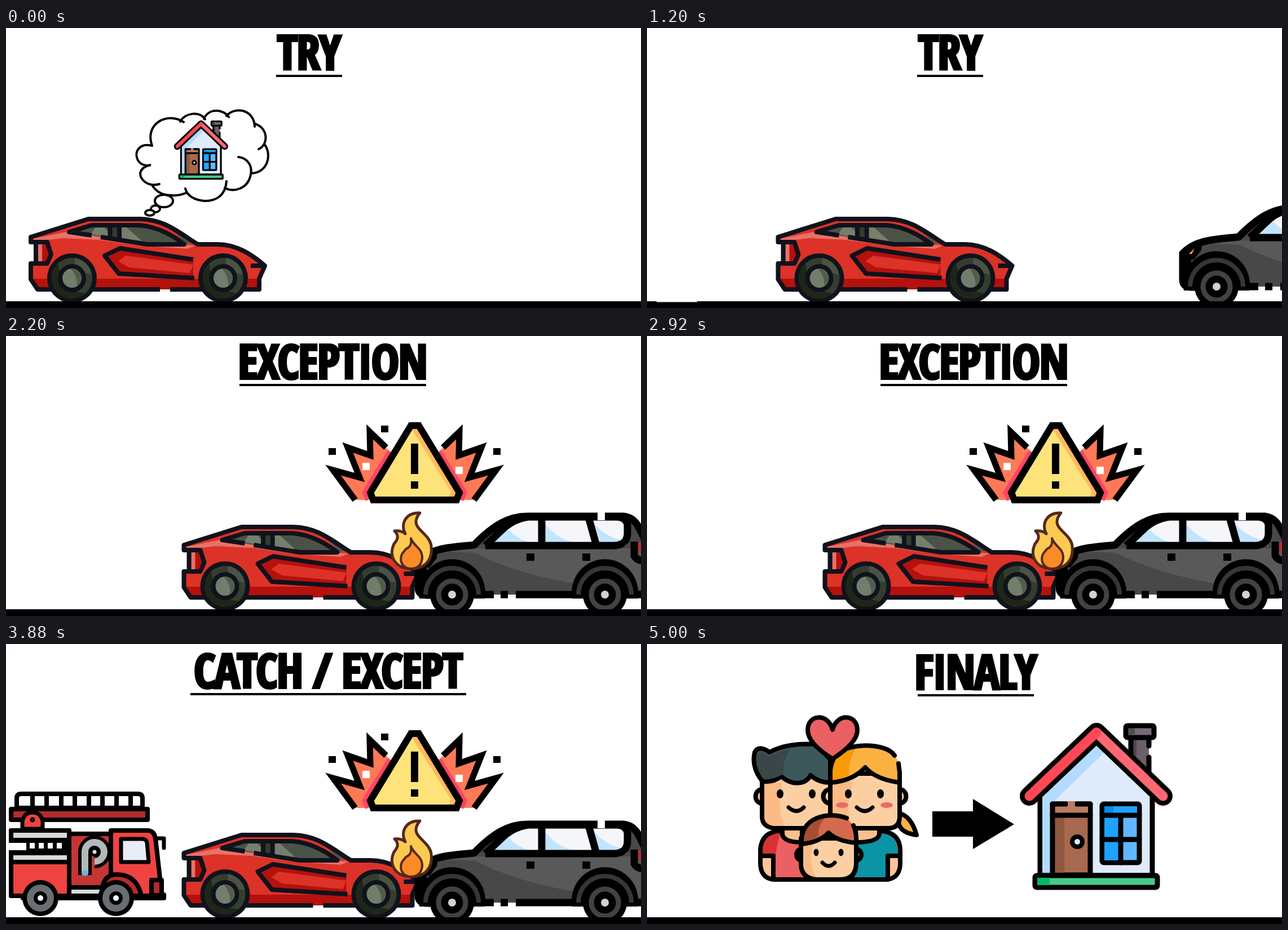
Recreate the animation shown at these times as an HTML page. Size 1126x497 px, loop 5.8 s.

```html
<!DOCTYPE html>
<html lang="en">
<head>
<meta charset="utf-8">
<title>Try, catch, finally</title>
<style>
html, body { margin: 0; width: 100%; height: 100%; overflow: hidden; background: #fff; }
svg { display: block; width: 100%; height: 100%; }
#title {
  font: 900 84px "Open Sans Condensed", "Roboto Condensed", "Open Sans", sans-serif;
  font-stretch: extra-condensed; letter-spacing: -2px; text-anchor: middle;
  stroke: #000; stroke-width: 4;
}
.line { fill: none; stroke: #000; }
.ink { stroke: #000; stroke-linejoin: round; stroke-linecap: round; }
.layer { display: none; }
</style>
</head>
<body>
<svg viewBox="0 0 1126 497">
<defs>
  <g id="carWheel">
    <circle r="44" fill="#10121c"/><circle r="36" fill="#343e2f"/>
    <path d="M-25-26A36 36 0 0 0 24 27Q-18 22-25-26" fill="#1e2717"/>
    <path d="M5-36A36 36 0 0 1 35-6L20-10Q16-22 5-25Z" fill="#4a5344"/>
    <circle r="25" fill="#10121c"/><circle r="17" fill="#727d6b"/>
    <path d="M-2-17A17 17 0 0 1 9 14Q10-3-2-17" fill="#535d4d"/>
  </g>
  <g id="suvWheel">
    <path d="M-58 7A59 59 0 1 1 58 7Z"/>
    <path d="M-47 0A47 47 0 0 1 47 0" fill="none" stroke="#363636" stroke-width="8"/>
    <circle r="39"/>
    <circle r="24" fill="none" stroke="#424242" stroke-width="9"/>
    <circle r="7" fill="#d2d2d2"/>
  </g>
  <g id="truckWheel">
    <circle r="32"/><circle r="24" fill="#696e73"/><circle r="12"/>
  </g>
  <g id="burst">
    <path d="M618 291 580 238 627 251 606 198 646 212 645 170 681 205 637 291Z" fill="#ff7956"/>
    <path d="M681 205 636 278 642 291" fill="none" stroke="#ff4368" stroke-width="9"/>
    <path class="line" d="M619 291 580 238 627 251 606 198 646 212 645 170 674 198" stroke-width="11" stroke-miterlimit="8"/>
    <path d="M572 199h13v12h-13z"/>
  </g>
  <g id="home">
    <g class="ink" stroke-width="9">
      <path d="M858 165h32v62l-32-30z" fill="#6b6067" stroke="none"/>
      <path d="M858 165h10v45l-10-10z" fill="#51474f" stroke="none"/>
      <path d="M858 165v45M890 165v16M890 201v27" fill="none"/>
      <rect x="849" y="145" width="50" height="21" rx="3" fill="#776a76"/>
      <path d="M854 150h11v12h-11z" fill="#544a52" stroke="none"/>
      <path d="M697 265 797 170 896 265V411H697Z" fill="#dfeafb"/>
      <path d="M701 268 797 176 812 191 716 285V406H701Z" fill="#b3dbff" stroke="none"/>
      <path d="M719 410V284H786V410Z" fill="#a8694f"/>
      <path d="M724 305h16v101h-16z" fill="#8f573f" stroke="none"/>
      <path d="M724 284h58v17h-58z" fill="#b97c63" stroke="none"/>
      <path d="M719 304H786M719 284H743M762 284H786" fill="none"/>
      <path d="M746 279h13v9h-13z" fill="#b97c63" stroke="none"/>
      <circle cx="763" cy="351" r="9" fill="#dfeafb" stroke-width="8"/>
      <rect x="807" y="284" width="66" height="104" rx="3" fill="#61b7ff"/>
      <path d="M811 288h25v96h-25z" fill="#20a2ff" stroke="none"/>
      <path d="M811 288h16v12h-16z" fill="#0789ef" stroke="none"/>
      <path d="M827 288h42v12h-42z" fill="#20a2ff" stroke="none"/>
      <path d="M807 304H873M807 347H873M840 304V388" fill="none"/>
      <rect x="688" y="411" width="217" height="21" rx="3" fill="#45ca8b"/>
      <path d="M692 415h22v13h-22z" fill="#00b767" stroke="none"/>
      <path d="M678 270 797 157 915 270" fill="none" stroke-width="34"/>
      <path d="M797 157 915 270" fill="none" stroke="#ff6773" stroke-width="17"/>
      <path d="M678 270 797 157" fill="none" stroke="#ff4855" stroke-width="17"/>
    </g>
  </g>
</defs>

<text id="title"></text>
<rect id="underline" height="4"/>

<g id="thought" class="layer">
  <g class="line" stroke-width="4" stroke-linecap="round">
    <path d="M259 209C245 170 286 148 315 167M309 166C318 150 344 147 353 162M351 161C360 141 386 144 395 158M391 156C407 138 440 145 441 175M441 170C464 176 467 206 448 215M458 206C473 226 463 258 434 258M412 229C429 231 437 245 434 260C429 286 404 292 388 284M391 272C389 298 372 307 353 307C335 306 321 298 318 285M321 292Q308 298 294 297Q270 297 259 279M272 277C250 283 238 268 238 258Q240 246 257 243Q242 247 234 235C226 220 237 203 259 209"/>
    <ellipse cx="280" cy="307" rx="16" ry="11"/>
    <ellipse cx="265" cy="321" rx="8" ry="6" fill="#fff"/>
    <ellipse cx="255" cy="328" rx="8" ry="5" fill="#fff"/>
  </g>
  <use href="#home" transform="translate(63 114.3) scale(.355)"/>
</g>

<g id="car" class="layer">
  <path d="M44 371 146 339H238C280 340 302 360 340 384H375C410 384 437 403 459 422L449 445V464H56L44 446V418H53V380H44Z" fill="#dc3228"/>
  <path d="M48 374 112 361 170 371 250 385 318 385 336 386 322 392 235 386 165 376 100 373 48 379Z" fill="#e77268"/>
  <path d="M48 445H449V464H56Z" fill="#b5110d"/>
  <path d="M268 346Q300 357 332 382L318 382Q300 358 268 346" fill="#4a5144"/>
  <path d="M53 380H73L80 402 73 418H53Z" fill="#b5110d"/>
  <path d="M57 384h7v30h-7z" fill="#e77268"/>
  <path d="M200 392 332 412V441L202 436 176 404Z" fill="#b5110d"/>
  <path d="M199 414 212 404 332 420 326 435 218 425Z" fill="#dc3228"/>
  <path d="M112 362 152 350H235C270 352 300 371 316 384H250Z" fill="#4b5346"/>
  <path d="M150 366 160 352H172L181 361V371ZM205 352H212L243 380 205 374Z" fill="#767f6c"/>
  <path d="M188 352h9v22h-9z" fill="#323b2c"/>
  <g fill="none" stroke="#10121c" stroke-width="8" stroke-linejoin="round">
    <path d="M273 464H56L44 446V418H53V380H44V371L146 339H238C280 340 302 360 340 384H375C410 384 437 403 459 422L449 445V464H291M53 380H73L80 402 73 418H53"/>
    <path d="M152 368 112 362 152 350H235C270 352 300 371 316 384H250L168 371M184.500 350V373M201 350V376"/>
    <path d="M332 411 202 391 175 404 200 436 334 444M434 422H459"/>
  </g>
  <use href="#carWheel" x="117" y="444"/>
  <use href="#carWheel" x="385" y="444"/>
</g>

<g id="suv" class="layer">
  <path d="M731 400C755 375 790 375 830 371C865 335 892 320 925 320H1095C1123 322 1128 350 1140 380V459H745L731 450Z" fill="#484848"/>
  <path d="M775 384Q805 375 840 377H1130V450Q1060 446 1000 438Q900 420 832 385Q800 382 775 384Z" fill="#595959"/>
  <path d="M850 372 905 328H1092Q1106 330 1108 352L1100 372Z" fill="#f4f6fa"/>
  <path d="M862 367 889 341Q905 360 930 367ZM957 334Q975 360 1010 367H957ZM1043 333Q1062 356 1094 363L1085 367H1053Z" fill="#c1e4ff"/>
  <g class="line" stroke-width="13" stroke-linejoin="round">
    <path d="M766 460H745Q731 460 731 446V400C755 375 790 375 830 371C865 335 892 320 925 320H1095C1118 323 1122 340 1132 360"/>
    <path d="M850 372 885 339Q902 325 925 321M850 372H1080Q1102 370 1102 350V335Q1100 323 1085 321M950 320V372M1033 322 1047 372"/>
    <path d="M825 459H865M877 459H890M904 459H1015M1105 459H1140M1114 365V390Q1118 398 1130 399"/>
  </g>
  <path d="M731 397 765 382 764 394 751 411H746V440H731Z"/>
  <path d="M742 401 752 391 747 401Z" fill="#ffad35"/>
  <path d="M1121 366h5v17h-5z" fill="#b92e32"/>
  <path d="M923 386h14v13h-14zM1022 386h14v13h-14z"/>
  <path d="M1049 312h13v15h-13z" fill="#fff"/>
  <use href="#suvWheel" x="791" y="459"/>
  <use href="#suvWheel" x="1062" y="459"/>
</g>

<g id="warning" class="layer">
  <use href="#burst"/>
  <use href="#burst" transform="matrix(-1 0 0 1 1449 0)"/>
  <path d="M665 159h13v12h-13z"/>
  <path d="M632 225h13v13h-13zM797 232h13v13h-13z" fill="#fff"/>
  <path d="M718 159H732L804 278 800 291H651L646 278Z" fill="#fee37a"/>
  <path d="M719 165H731L800 278 797 286H785L789 276Z" fill="#ffb960"/>
  <path class="line" d="M718 159H732L804 278 799 291H651L646 278Z" stroke-width="12"/>
  <path d="M718 191h13v54h-13zM718 258h13v13h-13z"/>
</g>

<g id="fire" class="layer" stroke="#54281d" stroke-width="5" stroke-linejoin="round">
  <path d="M734 314C708 313 699 334 708 351Q701 345 689 346C698 355 694 362 688 369C678 391 690 413 719 413C746 413 757 394 754 372C751 353 727 344 727 330Q727 322 734 314Z" fill="#fbca52"/>
  <path d="M718 359C723 374 739 376 738 395C736 408 728 413 718 413C704 413 698 401 701 390C703 383 707 382 709 378C719 374 719 366 718 359Z" fill="#fb8b26" stroke-width="4"/>
</g>

<g id="truck" class="layer">
  <g class="ink" stroke-width="8">
    <path d="M19 291V274Q19 266 27 266H234Q242 266 242 274V291Z" fill="#fff"/>
    <path d="M47 268V291M72 268V291M98 268V291M122 268V291M147 268V291M171 268V291M196 268V291M221 268V291" fill="none"/>
    <rect x="9" y="293" width="242" height="19" fill="#b32b2c"/>
    <path d="M29 328V315Q32 299 47 299Q62 299 65 315V328Z" fill="#ef4341" stroke-width="7"/>
    <circle cx="47" cy="312" r="2" fill="#fff" stroke-width="5"/>
    <rect x="9" y="331" width="103" height="116" fill="#ef4341"/>
    <path d="M9 331H112V348H9ZM9 371H112V387H9Z" fill="#d6dad9"/>
    <path d="M9 348H112V371H9Z"/>
    <path d="M4 353h32v13H4zM42 353h9v10h-9zM58 353h9v10h-9zM74 353h9v10h-9zM90 353h9v10h-9z" fill="#fff" stroke="none"/>
    <path d="M112 337H186V447H112Z" fill="#c43636"/>
    <path d="M112 432H176V447H112Z" fill="#d6dad9"/>
    <path d="M140 410V370A17 17 0 1 1 157 386" fill="none" stroke-width="24" stroke-linecap="butt"/>
    <path d="M140 408V370A17 17 0 1 1 157 386" fill="none" stroke="#b4b8b9" stroke-width="12" stroke-linecap="butt"/>
    <circle cx="157" cy="369" r="6" fill="#d6dad9" stroke-width="5"/>
    <path d="M135 402h10v9h-10z" fill="#62b9dc" stroke="none"/>
    <path d="M186 331H252Q263 332 265 345L273 415V447H186Z" fill="#ef4341"/>
    <path d="M204 346H242Q249 346 250 353L253 387H204Z" fill="#e8eef8" stroke-width="7"/>
    <path d="M264 345H280V362" fill="none" stroke-width="7"/>
    <path d="M170 440Q172 409 196 409Q232 409 240 447H170" fill="#b32b2c"/>
    <path d="M258 419H276V446H258Z" fill="#b32b2c"/>
    <path d="M9 447H30V451M92 451H164M226 451H280V445" fill="none"/>
  </g>
  <use href="#truckWheel" x="61" y="451"/><use href="#truckWheel" x="195" y="451"/>
  <g fill="#fff"><circle cx="61" cy="451" r="5"/><circle cx="195" cy="451" r="5"/></g>
</g>

<g id="ambulance" class="layer">
  <g class="ink" stroke-width="8">
    <rect x="2" y="304" width="185" height="158" rx="6" fill="#ebebeb"/>
    <path d="M183 310V458H85Q177 430 174 308Z" fill="#cdcdcd" stroke="none"/>
    <path d="M200 323V313Q201 304 210 304Q219 304 220 313V323Z" fill="#ff7775"/>
    <path d="M187 324H216Q226 324 233 333L268 382Q289 388 289 402V462H187Z" fill="#ebebeb" stroke="none"/>
    <path d="M270 385Q289 388 289 402V462H250Q275 440 270 385" fill="#cdcdcd" stroke="none"/>
    <path d="M4 408H285V421H4Z" fill="#ff7775" stroke="none"/>
    <path d="M2 405H126M140 405H289M2 424H289" fill="none"/>
    <path d="M187 324H216Q226 324 234 336M244 349 268 382Q289 388 289 402V462H187V324" fill="none"/>
    <path d="M191 333H216L253 387H191Z" fill="#82b9ce"/>
    <path d="M195 337H205Q220 356 211 368Q204 378 195 376Z" fill="#d9f0f8" stroke="none"/>
    <path d="M84 327h20v18h19v19h-19v19h-20v-19h-19v-19h19z" fill="#ff7775"/>
    <path d="M210 267V276M186 280 191 285M234 280 229 285" fill="none" stroke-width="9"/>
    <path d="M2 451H30M84 451H206M260 451H289" fill="none" stroke-width="6"/>
  </g>
  <use href="#truckWheel" x="57" y="452"/><use href="#truckWheel" x="233" y="452"/>
  <g fill="#a5d9ef"><circle cx="57" cy="452" r="5"/><circle cx="233" cy="452" r="5"/></g>
</g>

<g id="family" class="layer">
  <g class="ink" stroke-width="8">
    <path d="M224 418Q201 415 201 388V365Q203 334 235 332H415Q448 335 449 365V388Q449 414 427 418Z" fill="#eb6062"/>
    <path d="M205 372Q203 337 237 336Q225 365 228 414H224V376H205Z" fill="#d73133" stroke="none"/>
    <path d="M330 336H415Q445 338 445 372H427V414H330Z" fill="#0b93a6" stroke="none"/>
    <path d="M205 380H220V413Q205 409 205 388ZM445 380H430V413Q445 409 445 388Z" fill="#fcc597" stroke="none"/>
    <path d="M201 376H224V416M449 376H427V416" fill="none"/>
    <path d="M240 327V338Q243 352 275 352V327ZM412 327V338Q409 352 370 352V327Z" fill="#fcc08f"/>
    <path d="M447 300Q469 306 478 339Q438 334 447 300Z" fill="#fbb142"/>
    <path d="M204 258A11 12 0 0 0 204 283M448 258A11 12 0 0 1 448 283" fill="#fcc597"/>
    <path d="M204 230H325V327H225Q204 324 204 306Z" fill="#fccfa3"/>
    <path d="M208 246H240Q230 295 244 323H226Q208 321 208 306Z" fill="#fcba85" stroke="none"/>
    <path d="M205 244C188 224 188 204 191 192C197 180 211 187 217 192C240 180 270 176 300 178L325 205V246Q304 246 290 233C281 251 256 251 238 235Q225 246 205 244Z" fill="#3c585a"/>
    <path d="M207 239C193 222 193 206 195 194Q204 189 216 199Q241 188 254 187Q240 207 242 231Q224 241 207 239Z" fill="#3a4647" stroke="none"/>
    <path d="M325 258A12 12 0 0 0 325 283" fill="#fcc597"/>
    <path d="M325 230H448V308Q447 327 428 327H345Q325 324 325 306Z" fill="#fccfa3"/>
    <path d="M329 244H365Q350 295 364 323H346Q329 321 329 306Z" fill="#fcba85" stroke="none"/>
    <path d="M325 246V225Q328 195 350 187C385 174 430 182 440 199L448 212V246Q405 240 387 219Q365 243 325 246Z" fill="#fbb142" stroke="none"/>
    <path d="M329 241V222Q335 190 370 185Q357 207 358 232Q345 240 329 241" fill="#fa9a04" stroke="none"/>
    <path d="M439 198C428 181 385 174 350 187Q328 195 325 225V246Q365 243 387 219Q405 240 448 246V228L446 212" fill="none"/>
    <path d="M329 204C310 192 285 173 285 153C285 124 321 122 329 152C337 122 373 124 373 153C373 173 346 193 329 204Z" fill="#eb6062"/>
    <path d="M274 364A9 10 0 0 0 274 384M371 364A9 10 0 0 1 371 384" fill="#fcc597"/>
    <path d="M273 345H371V390Q370 418 343 418H300Q273 415 273 390Z" fill="#fccfa3"/>
    <path d="M277 353H295Q285 395 301 414Q277 411 277 390Z" fill="#fcba85" stroke="none"/>
    <path d="M274 355C271 324 295 303 322 304Q345 304 355 310L365 321Q372 335 371 353Q337 350 322 335Q306 352 274 355Z" fill="#d4694d" stroke="none"/>
    <path d="M278 350Q278 312 315 309Q302 325 304 341Q292 349 278 350" fill="#a64d34" stroke="none"/>
    <path d="M354 309C322 297 271 306 274 355Q306 352 322 335Q337 350 371 353Q372 334 366 322" fill="none"/>
    <path d="M251 290Q265 303 278 290M372 290Q386 303 400 290M311 388Q322 400 333 388" fill="none" stroke-width="7"/>
  </g>
  <ellipse cx="346" cy="286" rx="11" ry="5" fill="#ec6869"/>
  <ellipse cx="425" cy="286" rx="11" ry="5" fill="#ec6869"/>
  <ellipse cx="236" cy="266" rx="6" ry="8"/><ellipse cx="293" cy="266" rx="6" ry="8"/>
  <ellipse cx="357" cy="266" rx="6" ry="8"/><ellipse cx="414" cy="266" rx="6" ry="8"/>
  <ellipse cx="300" cy="370" rx="4.500" ry="6.500"/><ellipse cx="344" cy="370" rx="4.500" ry="6.500"/>
  <path d="M506 297H578V275L651 320 578 364V342H506Z"/>
  <use href="#home"/>
</g>

<rect y="485" width="1126" height="12"/>
<path id="glint" class="layer" d="M17 485h72v1.500h-72z" fill="#f4f4f4"/>
</svg>
<script>
const TRY = ["TRY", 479, 596, 75];
const EXCEPTION = ["EXCEPTION", 414, 745, 77];
const CATCH = ["CATCH / EXCEPT", 327, 816, 79];
const FINALLY = ["FINALY", 480, 686, 81];
const crash = { car: 271.5, suv: 0, warning: 0 };

// Each scene: duration in ms, heading, and the horizontal offset of every visible layer.
const scenes = [
  [600, TRY, { car: 0, thought: 0 }],
  [600, TRY, { car: 0 }],
  [1000, TRY, { car: 188.5, suv: 219, glint: 0 }],
  [1200, EXCEPTION, { ...crash, fire: 0 }],
  [800, CATCH, { ...crash, fire: 0, truck: 0 }],
  [800, CATCH, { ...crash, ambulance: 0 }],
  [800, FINALLY, { family: 0 }],
];
const loop = scenes.reduce((sum, [ms]) => sum + ms, 0);
const layers = document.querySelectorAll(".layer");
const title = document.getElementById("title");
const underline = document.getElementById("underline");
let current;

function setAll(element, attributes) {
  for (const name in attributes) element.setAttribute(name, attributes[name]);
}

function show([, [text, left, right, baseline], offsets]) {
  title.textContent = text;
  setAll(title, { x: (left + right) / 2 - 1, y: baseline - 1 });
  setAll(underline, { x: left, y: baseline + 8, width: right - left });
  for (const layer of layers) {
    const visible = layer.id in offsets;
    layer.style.display = visible ? "inline" : "none";
    if (visible) layer.setAttribute("transform", `translate(${offsets[layer.id]} 0)`);
  }
}

function tick() {
  let time = performance.now() % loop;
  const scene = scenes.find(([ms]) => (time -= ms) < 0);
  if (scene !== current) show(current = scene);
  requestAnimationFrame(tick);
}
tick();
</script>
</body>
</html>
```
